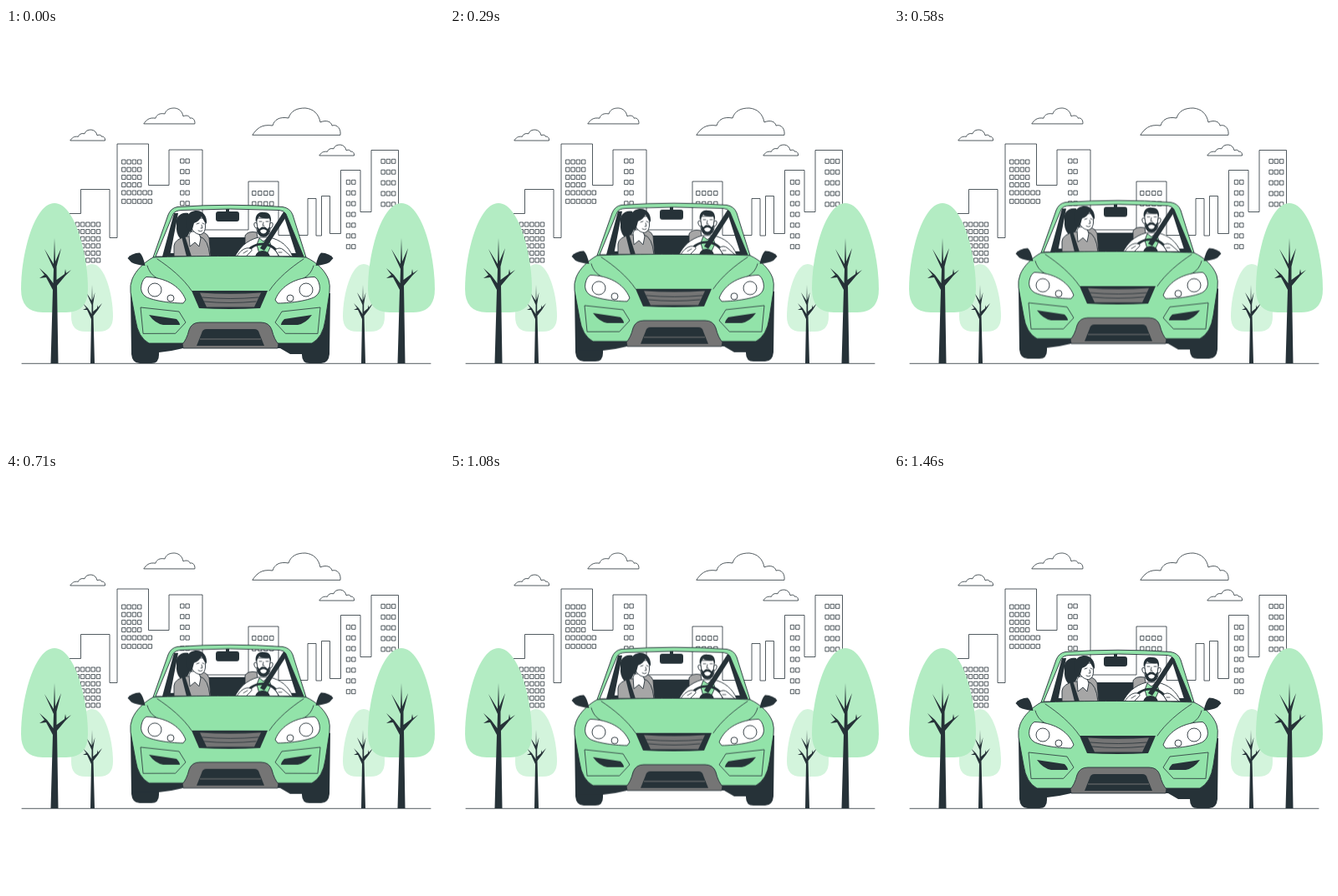
Write an HTML page that moves like this. It is 524 by 500 pixels and loops after 1500 ms.

```html
<!DOCTYPE html>
<html lang="en">
<head>
<meta charset="utf-8">
<title>City drive</title>
<style>
  html, body { margin: 0; width: 100%; height: 100%; overflow: hidden; background: #fff; }
  svg { display: block; width: 524px; height: 500px; }
  .line { fill: none; stroke: #263238; stroke-width: .8; stroke-linejoin: round; stroke-linecap: round; }
  .dark { fill: #263238; }
  .green { fill: #92e3a9; }
  .gray { fill: #757575; }
  .seat { fill: #a6a6a6; }
  .white { fill: #fff; }
  .edge { stroke: #263238; stroke-width: .9; stroke-linejoin: round; }
  #car { animation: bounce 1.5s cubic-bezier(.33, .06, .67, .94) infinite; }
  @keyframes bounce {
    0%, 97.3%, 100% { transform: none; }
    48.7% { transform: translateY(-6.3px); }
  }
</style>
</head>
<body>
<svg viewBox="0 0 524 500">
  <defs>
    <path id="cloud" class="line" vector-effect="non-scaling-stroke"
      d="M0 32C5 25 10 19 24 21C26 14 32 10 43 12C46 3 53 0 63 0C73 1 79 7 81 17C88 14 94 16 95 21C102 19 106 26 105 32Z"/>
    <path id="trunk" class="dark"
      d="M58 252L59 280 66 264 60.500 286V302L70 295 71 289 72 294 78 290 71 297 61 309 62.500 402H53.500L56 314 48 299 40 300 46 296 40 288 49 296 56.500 306 57 289 46 265 57 283Z"/>
    <path id="sapling" class="dark"
      d="M103 308L103.500 326 106.500 317 104.200 331V340L109 336V332L110 335 115 330 110 338 104.500 345 106 402H101L102 349 97 338 92 338 96 336 92 330 98 336 102.500 343V332L96 317 102.500 327Z"/>
    <path id="bush" fill="#d3f4dc" d="M103 283C118 283 128 319 128 346Q128 364 111 364H95Q78 364 78 346C78 319 88 283 103 283Z"/>
    <path id="crown" fill="#b3ecc3" d="M58 210C82 210 98 270 98 313Q98 341 72 341H44Q18 341 18 313C18 270 34 210 58 210Z"/>

    <path id="tyre" class="dark" d="M150 330H183V392Q183 402 174 402H160Q151 402 150 391Z"/>
    <g id="front">
      <path class="dark" d="M145.500 276Q150 270 160 269.500Q164 273 166.500 285Q156 284 150 281Z"/>
      <path class="line" d="M181 277C196 287 212 300 222 315M169 285C171 292 175 297 181 300M164 366L161 335 207 340 215 353 203 366Z"/>
      <path class="white edge" d="M168 298.500C189 299 208 308 215 326L212 330C194 330 173 326 167 322Q160 317 162 308Q164 300 168 298.500Z"/>
      <circle class="white edge" cx="178" cy="314" r="8"/>
      <circle class="white edge" cx="197" cy="324" r="4"/>
      <path class="dark" d="M171 344C181 346 194 347 204 349Q208 353 208 356H188Q178 354 171 344Z"/>
    </g>
  </defs>

  <g class="line">
    <path d="M70 222.500H89.500V193.500H124V251.500H133V139H170.500V188.500H195V146H235V242H290V184H326V248.500H361V204.500H371V249H377.500V201.500H387.500V246.500H400.500V170.500H424V220.500H437V146.500H469.500V222"/>
    <path id="panes"/>
  </g>
  <use href="#cloud" transform="translate(77 122) scale(.395)"/>
  <use href="#cloud" transform="translate(165 96) scale(.58)"/>
  <use href="#cloud" transform="translate(295 96)"/>
  <use href="#cloud" transform="translate(375 140) scale(.395)"/>
  <path class="line" d="M19 402.300H508"/>

  <use href="#bush"/>
  <use href="#sapling"/>
  <use href="#crown"/>
  <use href="#trunk"/>
  <use href="#bush" x="325"/>
  <use href="#sapling" x="324"/>
  <use href="#crown" x="415"/>
  <use href="#trunk" x="415"/>

  <g id="car">
    <use href="#tyre"/>
    <use href="#tyre" transform="matrix(-1 0 0 1 537 0)"/>
    <path class="dark" d="M149 318H388L387 391H340L328 384H212L198 387 183 389H150Z"/>

    <!-- cabin -->
    <path class="dark" d="M201 222H206L196 274H187ZM331 221H336L357 274H348ZM243 251H290V275H243ZM190 270H350V275H190Z"/>
    <path class="seat edge" d="M228 245Q240 243 243 252L245 274H228ZM286 249Q289 243 300 245L304 274H286Z"/>

    <!-- passenger -->
    <path class="dark" d="M218 222C208 220 202 228 204 236Q203 246 208 252H216L222 240Z"/>
    <path class="seat edge" d="M201 274V261Q202 253 216 250H232Q242 253 244 274Z"/>
    <path class="white edge" d="M219 248L220 262 226 257 231 262 233 252 230 244H221Z"/>
    <path class="white edge" d="M222 228H237Q239 234 238.500 239C238 245 235 248 231 247.500Q225 246 222 240Z"/>
    <path class="dark" d="M216 238C213 228 218 219 228 219C236 219 241 226 240 235Q236 231 234 226Q232 231 225 234L222 245Q218 243 216 238Z"/>
    <path class="line" d="M228 235L231 234M235 234L237 235M234 236L235 240H233M230 243Q233 245 235 243"/>
    <path class="dark" d="M210 250L214 249 222 274H216Z"/>

    <!-- driver -->
    <path class="white edge" d="M274 274C279 264 287 255 302 251H315C329 254 338 262 343 274Z"/>
    <path class="green edge" d="M303 252L308 256 314 251 317 261 311 274H304L300 260Z"/>
    <path class="white edge" d="M300 228H316V242Q315 250 308 250Q301 249 300 242Z"/>
    <path class="white edge" d="M300 234Q296 232 297 237Q298 241 301 240ZM316 234Q320 232 319 237Q318 241 315 240Z"/>
    <path class="dark" d="M299 233C297 224 303 220 308 221Q318 220 317 233L315 228Q306 229 303 226L301 229ZM300.500 238L303 241Q307 237 308 239Q309 237 313 241L315.500 238C316 248 312 250.500 308 250.500S300 248 300.500 238Z"/>
    <path class="white" d="M304 243Q308 239.500 312 243Q311 246.500 308 246.500T304 243Z"/>
    <path class="line" d="M303 232H306M311 232H314M308 233L307 237H309"/>
    <path class="dark" d="M331 222L336 225 309 267 304 264Z"/>
    <path d="M286 276C289 254 323 253 328 276" fill="none" stroke="#263238" stroke-width="3"/>
    <path class="dark" d="M298 274Q300 267 307 267T316 274Z"/>
    <path class="white edge" d="M276 274C280 267 286 263 291 264Q296 265 293 268L287 274ZM322 266Q327 262 332 266L341 274H327Z"/>
    <path class="line" d="M284 270L289 267M326 269H330"/>
    <path class="dark" d="M263 216H267V220H276Q279 220 279 223V229Q279 232 276 232H254Q251 232 251 229V223Q251 220 254 220H263Z"/>

    <!-- body -->
    <path class="green edge" fill-rule="evenodd" d="M176 275L194 224Q197 216 205 214.500Q268 210 331 214.500Q340 216 343 224L359 275ZM179 274H356L335 223Q333 219 327 218.500Q268 215.500 210 218.500Q202 219 200 223Z"/>
    <path class="green edge" d="M176 275C215 273 318 273 359 275C372 281 382 291 386 302Q388 308 387 317L382 350Q379 371 366 378H171Q158 371 155 350L149 317Q148 308 151 301C155 291 165 281 176 275Z"/>
    <use href="#front"/>
    <use href="#front" transform="matrix(-1 0 0 1 537 0)"/>
    <path class="dark" d="M222 315H313L304 336Q268 338 231 336Z"/>
    <path class="gray" d="M232 317.500Q268 320 305 317.500L297 334.500H240Z"/>
    <path class="line" d="M235 323Q268 326 302 323M237 328Q268 331 299 328"/>
    <path class="gray edge" d="M212 384L211 379Q216 374 219 362Q222 353 232 353H305Q315 353 318 362Q321 374 326 379L325 384Z"/>
    <path class="dark" d="M228 381L234 366Q235 361 240 361H297Q302 361 303 366L309 381Z"/>
    <path d="M232 373H305" stroke="#757575" stroke-width="1.200"/>
  </g>
</svg>
<script>
  const panes = [];
  // One block of windows: first corner, counts, column and row pitch
  function grid(x, y, cols, rows, dx, dy) {
    for (let r = 0; r < rows; r++)
      for (let c = 0; c < cols; c++)
        panes.push(`M${x + c * dx} ${y + r * dy}h4v5h-4z`);
  }
  grid(83.5, 233, 5, 6, 6.3, 8.6);
  grid(139, 158, 4, 4, 6.3, 9.2);
  grid(139, 195, 6, 2, 6.3, 10.3);
  grid(209, 157, 2, 5, 6.3, 12.7);
  grid(295, 195.5, 4, 2, 7, 12.7);
  grid(407.7, 182.3, 2, 7, 6.3, 12.9);
  grid(449.3, 157.3, 3, 5, 6.3, 12.9);
  document.getElementById('panes').setAttribute('d', panes.join(''));
</script>
</body>
</html>
```
